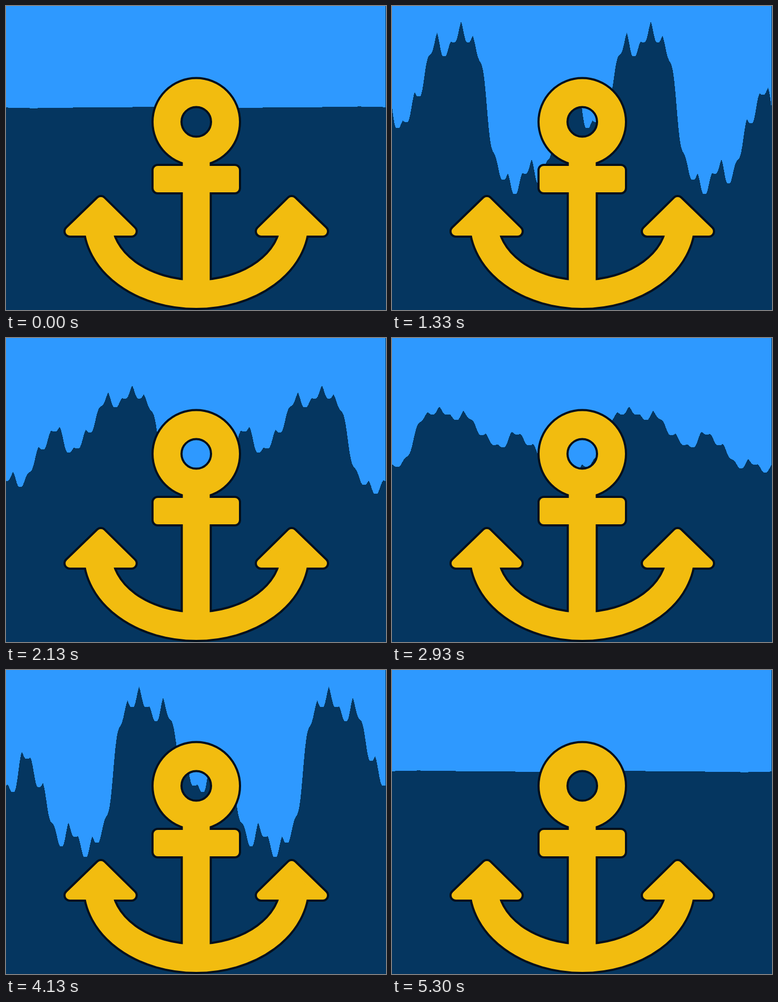
Write an HTML page that moves like this. It is 721x576 px and loops after 5330 ms.

```html
<!DOCTYPE html>
<html lang="en">
<head>
<meta charset="utf-8">
<title>Anchor</title>
<style>
  html, body { margin: 0; width: 100%; height: 100%; overflow: hidden; background: #053660; }
  svg { display: block; }
  .outline { --edge: 8px; --tint: #020f1c; }
  .gold { --edge: 0px; --tint: #f2bc0f; }
  .beam { fill: none; stroke: var(--tint); stroke-width: calc(51px + var(--edge)); }
  .plate { fill: var(--tint); stroke: var(--tint); stroke-width: calc(16px + var(--edge)); stroke-linejoin: round; }
</style>
</head>
<body>
<svg width="721" height="576" viewBox="0 0 721 576">
  <defs>
    <g id="anchor">
      <circle class="beam" cx="361" cy="219.5" r="55.5"/>
      <path class="beam" d="M361 276V545"/>
      <path class="beam" d="M174.5 410A186.5 136.5 0 0 0 547.5 410"/>
      <rect class="plate" x="288" y="311" width="146" height="34"/>
      <path class="plate" d="M180 370L121 427H238Z"/>
      <path class="plate" d="M542 370L484 427H601Z"/>
    </g>
  </defs>
  <rect width="721" height="576" fill="#053660"/>
  <path id="sky" fill="#2e99ff" shape-rendering="crispEdges"/>
  <use href="#anchor" class="outline"/>
  <use href="#anchor" class="gold"/>
</svg>
<script>
  const LOOP = 5330, STEPS = 160, WIDTH = 720, LEVEL = 192, REACH = 2;
  // [harmonic, height in px]
  const HARMONICS = [[1, 121], [2, 60.5], [4, 30.25], [8, 15.1], [16, 12.3]];
  const sky = document.getElementById('sky');

  const wave = degrees => HARMONICS.reduce(
    (sum, [n, height]) => sum + height * Math.sin(n * degrees * Math.PI / 180), 0);

  // Parabolic swing: up in the first half of the loop, mirrored in the second.
  function swing(phase) {
    const s = phase * 2 % 1;
    return (phase < 0.5 ? 4 : -4) * s * (1 - s);
  }

  function draw(ms) {
    const tick = Math.floor(ms % LOOP / 10) * 10 + 4;
    const step = Math.min(STEPS - 1, Math.floor(tick * 3 / 100));
    const phase = (0.2 + step * (STEPS - 0.4) / (STEPS - 1)) / STEPS;
    const gain = swing(phase), shift = phase * 720;

    const line = [];
    for (let x = -REACH; x < WIDTH + REACH; x++) line.push(LEVEL + gain * wave(x - shift));

    // Each column takes the lowest point nearby: sharp crests, flat troughs.
    let d = 'M0 0';
    for (let x = 0; x < WIDTH; x++) {
      const y = Math.max(...line.slice(x, x + 2 * REACH + 1));
      d += `V${Math.round(y)}H${x + 1}`;
    }
    sky.setAttribute('d', d + 'V0Z');
  }

  const start = performance.now();
  function loop(now) {
    draw(Math.max(0, now - start));
    requestAnimationFrame(loop);
  }
  draw(0);
  requestAnimationFrame(loop);
</script>
</body>
</html>
```
